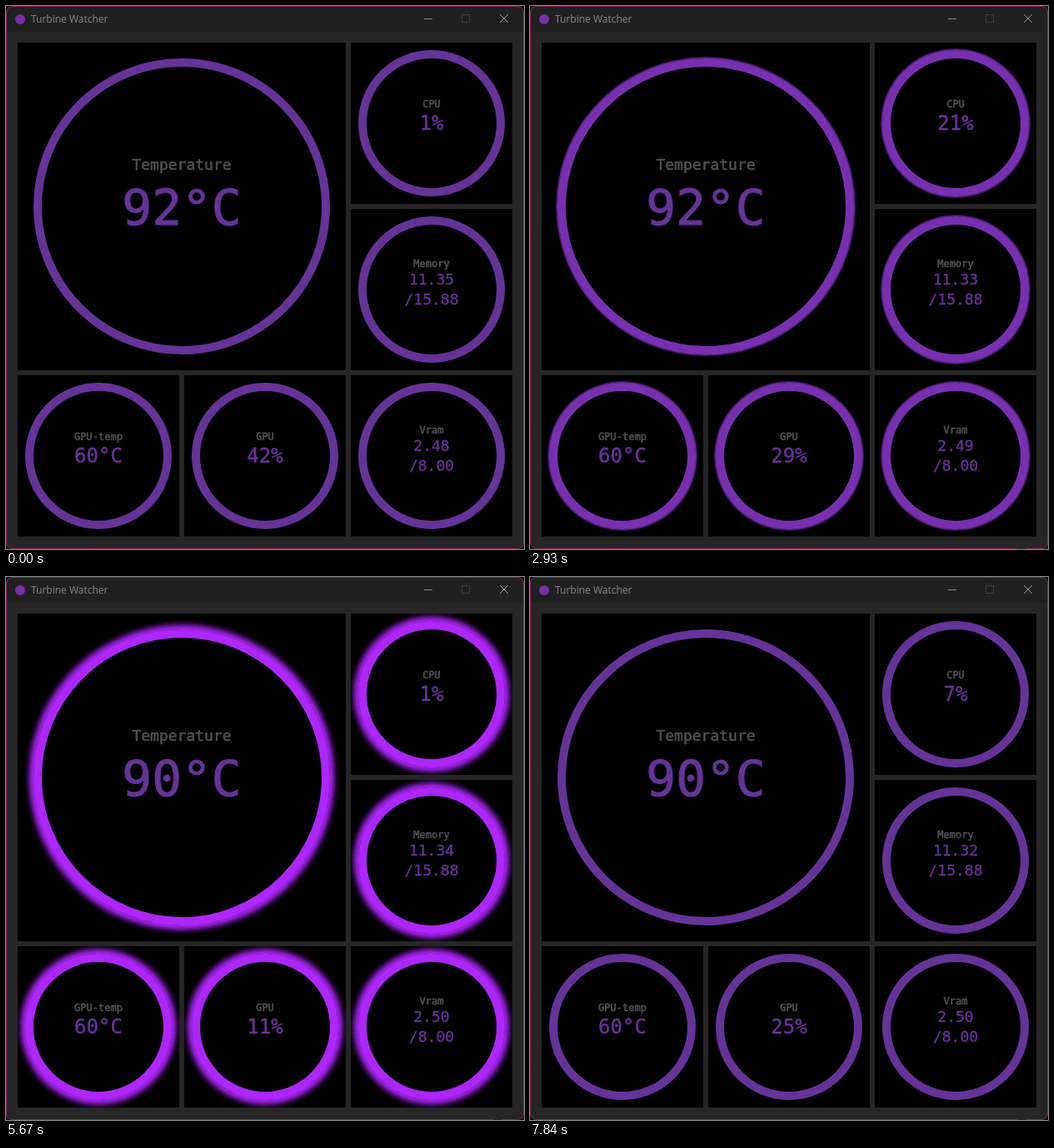
These frames come from a looping animation (622 px wide and 653 px high, 7.9 s). An HTML page:

```html
<!DOCTYPE html>
<html lang="en">
<head>
<meta charset="utf-8">
<title>Turbine Watcher</title>
<style>
  html, body { margin: 0; width: 100%; height: 100%; overflow: hidden; background: #141414; }
  #win {
    position: absolute; left: 0; top: 0; width: 622px; height: 653px;
    box-sizing: border-box; border: 1px solid #8c2260; border-radius: 8px;
    background: linear-gradient(#202020 30px, #262626 30px);
  }
  .card { position: absolute; overflow: hidden; background: #000; }
  .ring {
    position: absolute; inset: calc(5% - .7px);
    box-sizing: border-box; border: 10px solid #639; border-radius: 50%;
  }
  svg { position: absolute; left: 0; top: 0; }
  text { text-anchor: middle; font-family: "DejaVu Sans Mono", monospace; }
  .value { fill: #639; stroke: #639; stroke-width: .018em; }
  .label { fill: #505050; stroke: #505050; stroke-width: .6px; }
  .title { text-anchor: start; font: 12px "Open Sans", "Noto Sans", sans-serif; fill: #8e858c; }
</style>
</head>
<body>
<div id="win"></div>
<div id="cards"></div>
<svg id="ui" width="622" height="653" viewBox="0 0 622 653">
  <circle cx="17" cy="16" r="6" fill="#7a2fa8"/>
  <text class="title" x="30" y="20">Turbine Watcher</text>
  <g fill="none" stroke-width="1">
    <path d="M502 15.5h10" stroke="#8f858c"/>
    <rect x="547.5" y="10.5" width="9" height="9" stroke="#3c3a3c"/>
    <path d="M593 10l10 10M603 10l-10 10" stroke="#a0989e"/>
  </g>
  <rect id="speck" x="585" y="651" width="11" height="2" fill="#1c2a30"/>
</svg>
<script>
const LOOP = 7900, CYCLE = 4010, RISE_AT = 750, FALL_AT = 2230;
const RISE = 1200, FALL = 1850;
const BLUR = 9, SPREAD = 3;
const BASE = [102, 51, 153], NEON = [176, 38, 255];

// start time, temperature, cpu, memory, gpu temperature, gpu, vram
const READINGS = [
  [0, 92, 1, "11.35", 60, 42, "2.48"],
  [790, 92, 4, "11.32", 59, 40, "2.48"],
  [2270, 92, 21, "11.33", 60, 29, "2.49"],
  [3820, 92, 5, "11.33", 60, 30, "2.49"],
  [5330, 90, 1, "11.34", 60, 11, "2.50"],
  [6290, 90, 19, "11.31", 60, 29, "2.50"],
  [7840, 90, 7, "11.32", 60, 25, "2.50"]
];

const ui = document.getElementById("ui");
const speck = document.getElementById("speck");
const rings = [];

function addCard(x, y, size) {
  const card = document.createElement("div");
  card.className = "card";
  card.style.cssText = `left:${x}px;top:${y}px;width:${size}px;height:${size}px`;
  const ring = document.createElement("div");
  ring.className = "ring";
  card.append(ring);
  document.getElementById("cards").append(card);
  rings.push(ring);
}

function addText(kind, x, y, size, content = "") {
  const el = document.createElementNS("http://www.w3.org/2000/svg", "text");
  el.setAttribute("class", kind);
  el.setAttribute("x", x);
  el.setAttribute("y", y);
  el.setAttribute("font-size", size);
  el.textContent = content;
  ui.append(el);
  return el;
}

function addGauge(x, y, name) {
  addCard(x, y, 194);
  addText("label", x + 97, y + 78, 12, name);
  return addText("value", x + 97, y + 105, 24);
}

function addUsage(x, y, name, total) {
  addCard(x, y, 194);
  addText("label", x + 97, y + 70, 12, name);
  addText("value", x + 97, y + 115, 18, "/" + total);
  return addText("value", x + 97, y + 91, 18);
}

addCard(14, 44, 394);
addText("label", 211, 197, 18, "Temperature");
const fields = [
  addText("value", 211, 262.5, 59.5),
  addGauge(414, 44, "CPU"),
  addUsage(414, 244, "Memory", "15.88"),
  addGauge(14, 444, "GPU-temp"),
  addGauge(214, 444, "GPU"),
  addUsage(414, 444, "Vram", "8.00")
];
const units = ["°C", "%", "", "°C", "%", ""];

// cubic-bezier(.25, .1, .25, 1)
function ease(x) {
  const curve = (s, a, b) => 3 * s * (1 - s) ** 2 * a + 3 * s * s * (1 - s) * b + s ** 3;
  let lo = 0, hi = 1;
  for (let i = 0; i < 20; i++) {
    const mid = (lo + hi) / 2;
    if (curve(mid, .25, .25) < x) lo = mid; else hi = mid;
  }
  return curve(lo, .1, 1);
}

function glowAt(t) {
  const p = (t - RISE_AT + CYCLE) % CYCLE;
  const fall = p - (FALL_AT - RISE_AT);
  if (fall < 0) return ease(Math.min(1, p / RISE));
  return Math.max(0, 1 - fall / FALL) ** 3;
}

function draw(now) {
  const t = now % LOOP;
  const glow = glowAt(t);
  const color = `rgb(${BASE.map((c, i) => Math.round(c + (NEON[i] - c) * glow))})`;
  const layer = `0 0 ${(BLUR * glow).toFixed(2)}px ${(SPREAD * glow).toFixed(2)}px ${color}`;
  for (const ring of rings) {
    ring.style.borderColor = color;
    ring.style.boxShadow = glow > .03 ? `${layer}, ${layer}` : "none";
  }
  const reading = READINGS.filter(r => r[0] <= t).pop();
  fields.forEach((el, i) => {
    const s = reading[i + 1] + units[i];
    if (el.textContent !== s) el.textContent = s;
  });
  speck.style.visibility = t >= 1530 ? "visible" : "hidden";
}

const start = performance.now();
function tick() {
  draw(performance.now() - start);
  requestAnimationFrame(tick);
}
tick();
</script>
</body>
</html>
```
